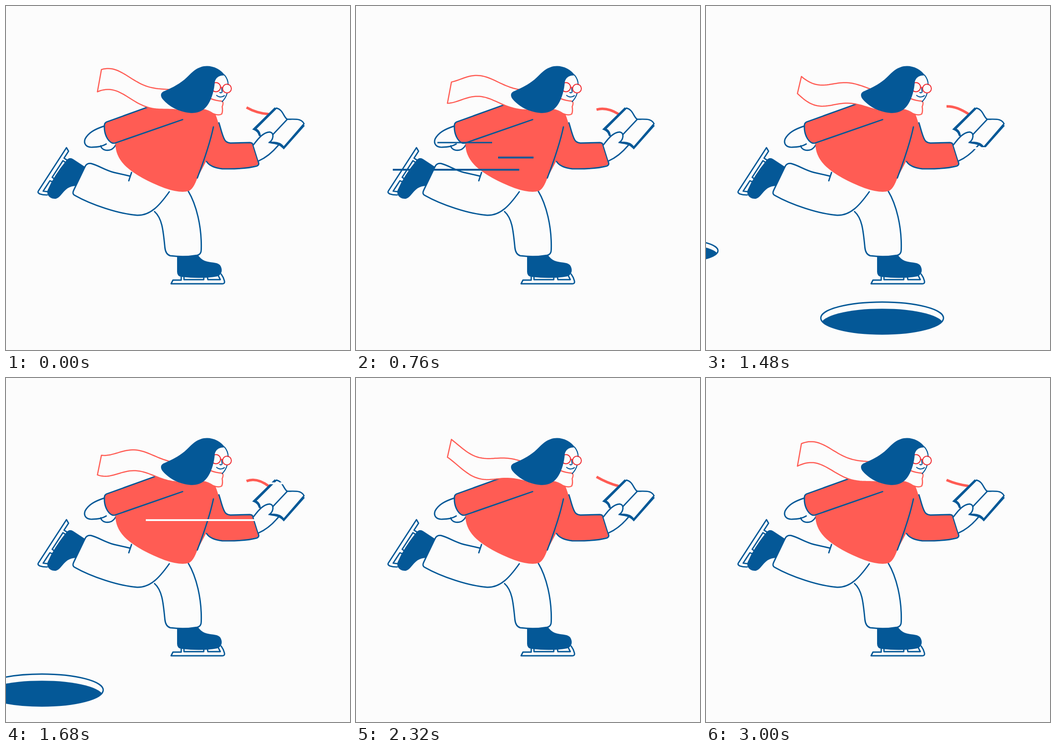
These frames come from a looping animation (748x748 px, 3040 ms). An HTML page:

```html
<!DOCTYPE html>
<html lang="en">
<head>
<meta charset="utf-8">
<title>Skating reader</title>
<style>
  html, body { margin: 0; width: 100%; height: 100%; overflow: hidden; background: #fcfcfc; }
  svg { display: block; width: 100vw; height: 100vh; }
  .ink { fill: none; stroke: #045897; stroke-width: 2.9; stroke-linecap: round; stroke-linejoin: round; }
  .paper, .ink.paper { fill: #fcfcfc; }
  .blue { fill: #045897; }
  .red { fill: #ff5c54; }
  .yarn { stroke: #ff5c54; stroke-width: 2.5; stroke-linejoin: round; }
  .glass { fill: none; stroke: #f0282e; stroke-width: 2; }
  .cover { stroke-width: 4.6; stroke-linecap: butt; stroke-linejoin: miter; }
  .thin { stroke-width: 2.2; }
</style>
</head>
<body>
<svg viewBox="0 0 748 748">
  <defs>
    <clipPath id="rim"><ellipse rx="97" ry="25.3"/></clipPath>
    <g id="hole">
      <ellipse class="paper" rx="97" ry="25.3"/>
      <ellipse class="blue" cy="10.5" rx="97" ry="25.3" clip-path="url(#rim)"/>
      <ellipse class="ink" rx="97" ry="25.3" vector-effect="non-scaling-stroke"/>
    </g>
    <g id="skate">
      <path class="ink paper" d="M381 588V596H363L359 604H471Q476 604 475 598Q473 590 468 583"/>
      <path class="ink" d="M387 589V595H430V590M438 590L439 595H466L462 587"/>
      <path class="blue" d="M372 543V578Q372 588 382 589Q425 594 459 588C470 585 472 572 465 563C457 556 445 559 432 554Q423 550 417 541Z"/>
    </g>
  </defs>

  <use id="farHole" href="#hole"/>
  <use id="nearHole" href="#hole"/>

  <!-- legs -->
  <use href="#skate"/>
  <use href="#skate" transform="translate(131.500 308) rotate(123) translate(-359 -604)"/>
  <path class="paper" d="M323 447C340 460 343 490 346 525Q347 540 358 543Q388 547 416 542Q425 540 425 530C426 480 414 432 396 402H355Z"/>
  <path class="ink" d="M323 447C340 462 342 490 345.500 525Q347 540 357 543Q388 547 416 542Q424.500 540 424.500 530C426 480 414 432 396 402"/>
  <path class="ink paper" d="M270 370L235 362C215 357 200 346 185 342.500Q176 341 172 349L147.500 400Q143 409 150 412C185 432 245 452 285 455C315 456 335 432 355 404"/>
  <path class="ink" d="M273 362L267 380"/>

  <!-- sweater and back hand -->
  <path class="ink paper" d="M214 261C192 268 179 276 172 289C168 300 175 308 188 307C198 307 210 305 218 300M206 304C208 313 219 316 229 312Q236 308 239 301"/>
  <path class="red" d="M215 254L330 212L380 226H432L456 237C462 252 464 266 474 288Q478 297 488 298L535 297Q545 320 549 345Q520 355 470 354Q443 352 436 336L416 374Q408 397 398 402Q380 408 345 396Q290 375 262 350Q238 328 238 300L231 298Q216 288 214 268Z"/>
  <path class="ink" d="M330 212L219 252Q214 254 214 260C213 277 220 293 231 298Q236 299 240 297L384 247M463 254C467 266 470 281 475 290Q478 297 488 298L530 297Q536 297 537 302L549 340Q551 346 545 348Q520 355 470 354Q444 351 436 338M451 263Q442 306 416 374"/>

  <!-- scarf and head -->
  <path id="scarf" class="paper yarn"/>
  <path class="paper" d="M445 150H475C486 163 486 190 470 208L440 205Z"/>
  <path class="paper yarn" d="M444 201Q456 206 470 207Q474 210 470 219Q472 228 469 235Q461 239 450 234Q440 227 428 225"/>
  <path class="ink thin" d="M475 150C481 157 483 163 483 171M481 189Q478 200 470 208M458 194.500Q466 201 475 195M469 179L470 187Q468 190 465 188"/>
  <circle class="glass" cx="456.5" cy="176.5" r="10"/>
  <circle class="glass" cx="480.5" cy="179.5" r="9.5"/>
  <path class="glass" d="M466 178Q468 175 471 178"/>
  <path class="blue" d="M476 151C467 136 446 128 430 131C410 135 402 148 388 160C372 173 356 180 342 186C335 190 336 197 341 203C355 219 375 230 400 232.500C420 234 432 226 440 213C448 200 453 182 454 165C456 156 463 150 476 151Z"/>

  <!-- book and front hand -->
  <path id="ribbon" fill="none" stroke="#ff5c54" stroke-width="5.5"/>
  <path class="ink paper" d="M543 267L588 222C602 225 603 240 611 246C627 247 642 243 648 256L604 307C598 298 588 295 574 297L552 282Q553 273 543 267Z"/>
  <path class="ink" d="M611 247L579 281"/>
  <path class="ink cover" d="M586 222L539.500 267.500Q549 271 552 282M574 297Q594 297 604 308.500L648 259"/>
  <path class="paper" d="M538 302C552 284 562 274 576 274C584 282 579 293 572 298L592 303Q572 327 549 337Z"/>
  <path class="ink" d="M538 302C550 286 560 275 573 274C584 275 582 291 572 297M592 303Q572 327 549 337"/>

  <g id="lines"></g>
</svg>
<script>
const LOOP = 3040, STEP = 40, PERIOD = LOOP / 3;
const byId = id => document.getElementById(id);
const swing = (t, peak) => Math.cos((t - peak) / PERIOD * 2 * Math.PI);

// Streaks: x of the left end at time `at`, speed in px per ms
const streaks = [
  { x: 177, at: 760, y: 297, len: 119, w: 3, speed: 1.5, color: '#045897' },
  { x: 309, at: 760, y: 329.5, len: 77, w: 4, speed: 1.5, color: '#045897' },
  { x: 80, at: 760, y: 356, len: 275, w: 4, speed: 1.5, color: '#045897' },
  { x: 304, at: 1680, y: 309, len: 240, w: 4, speed: 1.35, color: '#fcfcfc' },
  { x: 570, at: 1680, y: 229, len: 120, w: 4, speed: 1.35, color: '#fcfcfc' }
];
for (const s of streaks) {
  s.el = document.createElementNS('http://www.w3.org/2000/svg', 'path');
  s.el.setAttribute('d', `M0 ${s.y}h${s.len}`);
  s.el.setAttribute('stroke', s.color);
  s.el.setAttribute('stroke-width', s.w);
  byId('lines').append(s.el);
}

// One scarf edge: a wave running to the tail, growing with distance from the neck
function edge(t, x0, width, y0, slope, bend, amp, peak, lag) {
  const points = [];
  for (let i = 0; i <= 40; i++) {
    const d = width * i / 40;
    const y = y0 + slope * d - bend * d * d + amp * (1 - i / 40) * swing(t, peak - lag * d);
    points.push(`${(x0 + d).toFixed(1)} ${y.toFixed(1)}`);
  }
  return points;
}

function place(id, x, y, scale) {
  byId(id).setAttribute('transform', `translate(${x} ${y}) scale(${scale})`);
}

function draw(t) {
  const top = edge(t, 207.5, 158, 148, 0.222, 0, 20, 677, 5.4);
  const bottom = edge(t, 198.8, 175, 191, 0.25, 0.00028, 21, 725, 5.4);
  byId('scarf').setAttribute('d', 'M' + [...bottom.reverse(), ...top].join('L'));

  const tip = 220 + 5.3 * swing(t, 776), mid = 226 + 4.6 * swing(t, 50);
  byId('ribbon').setAttribute('d', `M523 ${tip}Q545 ${2 * mid - (tip + 235) / 2} 571 235`);

  place('farHole', 572 - (t - 1120) * 1.786, 532, 1);
  place('nearHole', 383 - (t - 1480) * 1.525, 678.5, 1.375);
  for (const s of streaks)
    s.el.setAttribute('transform', `translate(${s.x - (t - s.at) * s.speed} 0)`);
}

const start = performance.now();
function tick() {
  const t = (performance.now() - start) % LOOP;
  draw(Math.floor(t / STEP) * STEP);
  requestAnimationFrame(tick);
}
tick();
</script>
</body>
</html>
```
